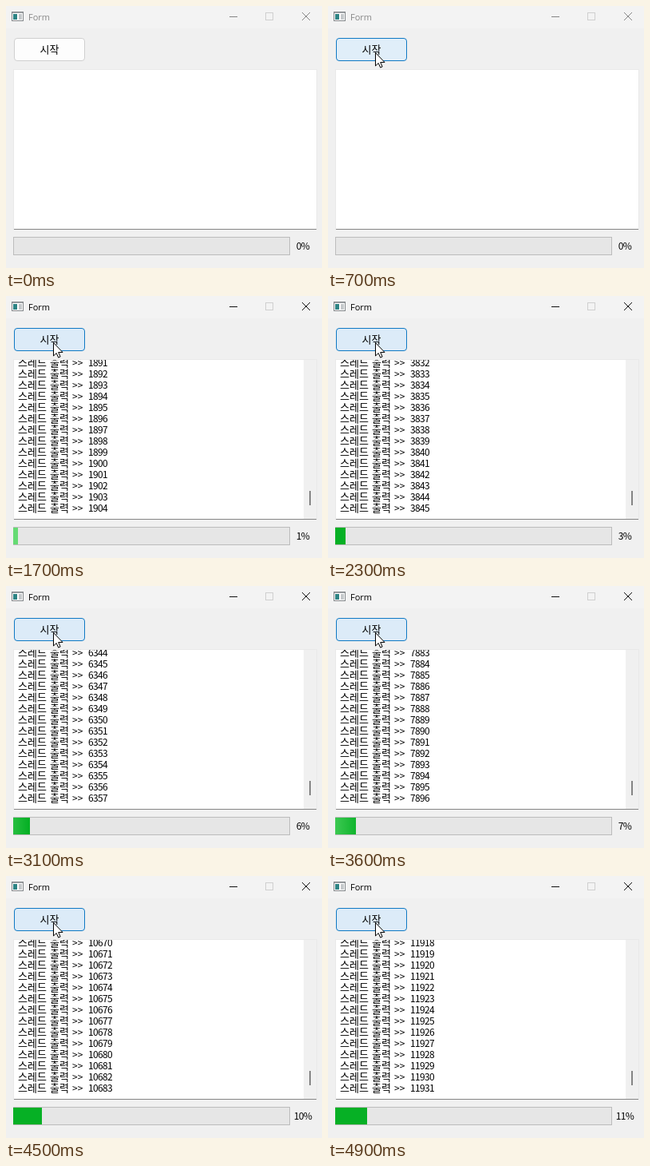
Write an HTML page with a canvas that moves like this. It is 396 by 328 pixels and loops after 5 s.

```html
<!DOCTYPE html>
<html lang="ko">
<head>
<meta charset="utf-8">
<style>
  html, body { margin: 0; height: 100%; overflow: hidden; background: #f0f0f0; }
  canvas { display: block; }
</style>
</head>
<body>
<canvas id="stage" width="396" height="328"></canvas>
<script>
const ctx = document.getElementById('stage').getContext('2d');
const LOOP = 5000, STEP = 100, PRESS = 800;
const CJK = '"Noto Sans CJK KR", "Noto Sans CJK JP", sans-serif';

// [time, lines printed] and [time, x, y] of the pointer
const COUNT = [[1110, 0], [1700, 1904], [2300, 3845], [3100, 6357], [4100, 9435], [4900, 11931]];
const POINTER = [[100, 109, 225], [200, 94, 140], [300, 76, 60], [400, 63, 16], [500, 59, 42], [600, 59, 59]];

function track(keys, t, k = 1) {
  if (t <= keys[0][0]) return keys[0][k];
  for (let i = 1; i < keys.length; i++) {
    const a = keys[i - 1], b = keys[i];
    if (t <= b[0]) return a[k] + (b[k] - a[k]) * (t - a[0]) / (b[0] - a[0]);
  }
  return keys[keys.length - 1][k];
}

function rect(x, y, w, h, color) {
  ctx.fillStyle = color;
  ctx.fillRect(x, y, w, h);
}

function frame(x, y, w, h, color) {
  ctx.strokeStyle = color;
  ctx.lineWidth = 1;
  ctx.strokeRect(x + .5, y + .5, w - 1, h - 1);
}

function text(str, x, y, font, color = '#000', spacing = 0, align = 'left') {
  ctx.font = font;
  ctx.letterSpacing = spacing + 'px';
  ctx.textAlign = align;
  ctx.fillStyle = color;
  ctx.fillText(str, x, y);
}

const hangul = (str, x, y) => text(str, x, y, '13px ' + CJK);
const digits = (str, x, y, align) => text(str, x, y, '12px ' + CJK, '#000', -.66, align);

function titleBar(active) {
  const ink = active ? '#111' : '#858585';
  rect(0, 0, 396, 28, '#f3f3f3');
  rect(7, 7, 15, 12, '#fff');
  rect(7, 7, 15, 2, '#a5a9ac');
  rect(9, 10, 5, 7, '#2f8585');
  rect(16, 10, 4, 7, '#c4c8ca');
  frame(7, 7, 15, 12, '#84888b');
  text('Form', 28, 18, '11px "Open Sans", sans-serif', active ? '#000' : '#888');
  rect(280, 13, 10, 1, ink);
  frame(325, 8, 10, 10, '#cfcfcf');
  ctx.strokeStyle = ink;
  ctx.beginPath();
  ctx.moveTo(371, 8); ctx.lineTo(381, 18);
  ctx.moveTo(381, 8); ctx.lineTo(371, 18);
  ctx.stroke();
}

function button(hover, pressed) {
  ctx.beginPath();
  ctx.roundRect(10.5, 40.5, 88, 28, 3.5);
  ctx.fillStyle = pressed ? '#dcebf8' : hover ? '#e0eef9' : '#fdfdfd';
  ctx.fill();
  ctx.lineWidth = 1;
  ctx.strokeStyle = hover ? '#0f79c4' : '#d0d0d0';
  ctx.stroke();
  hangul('시작', 42.5, 59);
}

function output(n) {
  rect(10, 80, 379, 199, '#fff');
  frame(9, 79, 381, 201, '#e9e9e9');
  ctx.save();
  ctx.beginPath();
  ctx.rect(10, 80, 363, 199);
  ctx.clip();
  for (let i = Math.max(1, n - 14); i <= n; i++) {
    const y = n < 14 ? 80 + 14 * i : 270 - 14 * (n - i);
    hangul('스레드', 15, y);
    hangul('출력', 55, y);
    text('>>', 83, y, '12px ' + CJK);
    digits(i, 103, y);
  }
  ctx.restore();
  if (n >= 14) {
    rect(373, 80, 16, 199, '#f0f0f0');
    rect(380, 244, 2, 18, '#858585');
  }
  rect(10, 279, 379, 1, '#868686');
}

function progress(n, t) {
  rect(9, 289, 347, 23, '#e6e6e6');
  frame(9, 289, 347, 23, '#bcbcbc');
  const w = Math.round(n / 300);
  if (w > 1) {
    rect(9, 290, w, 21, '#06b025');
    // light band sweeping across the filled part
    const end = 9 + (t + 345) % 490 * 1.28;
    const glow = ctx.createLinearGradient(end - 140, 0, end, 0);
    [[0, 0], [.2, .55], [.6, .55], [1, 0]].forEach(([p, a]) =>
      glow.addColorStop(p, `rgba(180,255,180,${a})`));
    rect(9, 290, w, 21, glow);
  }
  digits(Math.floor(n / 1000) + '%', 372, 305, 'center');
}

function pointer(x, y) {
  ctx.save();
  ctx.translate(x + .5, y - .5);
  ctx.beginPath();
  [[0, 0], [0, 16.5], [3.7, 13], [6.2, 18.6], [8.6, 17.5], [6.2, 12], [11.5, 12]]
    .forEach(p => ctx.lineTo(...p));
  ctx.closePath();
  ctx.fillStyle = '#fff';
  ctx.fill();
  ctx.strokeStyle = '#000';
  ctx.stroke();
  ctx.restore();
}

function draw(now) {
  const t = Math.floor(now % LOOP / STEP) * STEP;
  const n = Math.round(track(COUNT, t));
  const x = track(POINTER, t), y = track(POINTER, t, 2);
  const hover = t >= 100 && x > 10 && x < 99 && y > 40 && y < 69;
  rect(0, 0, 396, 328, '#f0f0f0');
  titleBar(t >= PRESS);
  button(hover, t >= PRESS);
  output(n);
  progress(n, t);
  if (t >= 100) pointer(x, y);
  requestAnimationFrame(tick);
}

const start = performance.now();
function tick() { draw(performance.now() - start); }
tick();
</script>
</body>
</html>
```
